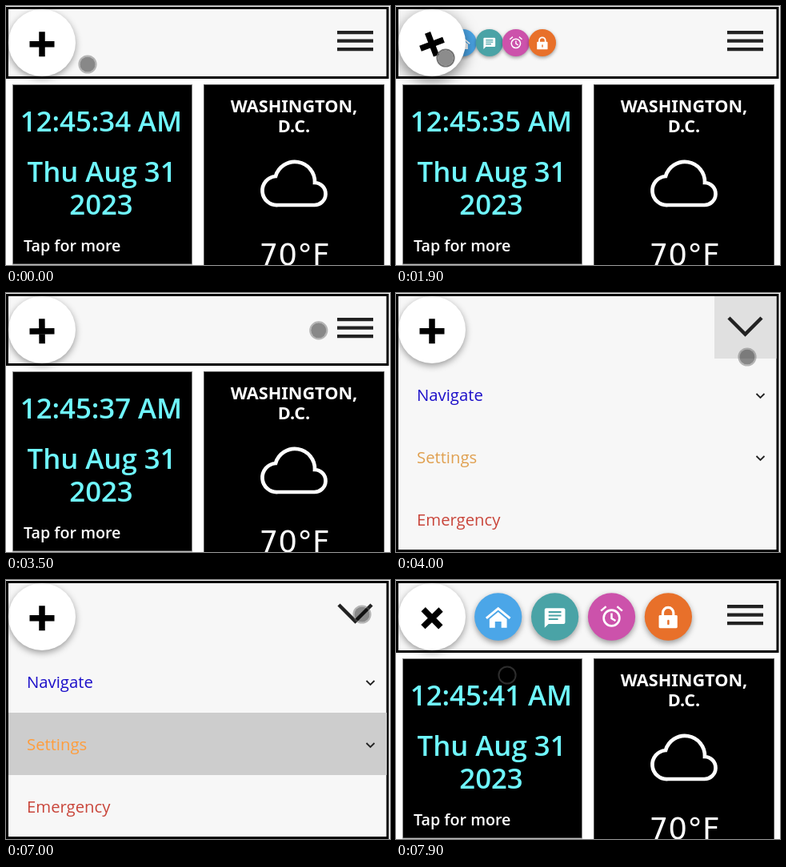
These frames come from a looping animation (480x324 px, 8 s). An HTML page:

```html
<!DOCTYPE html>
<html lang="en">
<head>
<meta charset="utf-8">
<title>Dashboard menu</title>
<style>
html, body { margin: 0; width: 480px; height: 324px; overflow: hidden; background: #fff; }
svg { display: block; }
text { font-family: "Open Sans", "Noto Sans", sans-serif; }
.clock { font-size: 34.8px; font-weight: 600; fill: #6ff7ff; text-anchor: middle; }
.city { font: 700 21.7px "Noto Sans", sans-serif; fill: #fff; text-anchor: middle; }
.degrees { font: 37.5px "DejaVu Sans", sans-serif; fill: #fff; text-anchor: middle; }
.row { font-size: 20.3px; }
.line { fill: none; stroke: #222; }
.white { fill: #fff; }
.stroke { fill: none; stroke: #fff; }
.raised { filter: drop-shadow(0 3px 4px rgba(0, 0, 0, .38)); }
.raised.pressed { filter: drop-shadow(0 6px 9px rgba(0, 0, 0, .5)); }
</style>
</head>
<body>
<svg width="480" height="324" viewBox="0 0 480 324">
  <g id="home">
    <rect x="8.5" y="98.5" width="224" height="224.5" stroke="#888"/>
    <rect x="247.5" y="98.5" width="225" height="240" stroke="#555"/>
    <text id="time" class="clock" x="119" y="157"></text>
    <text class="clock" x="119.5" y="220">Thu Aug 31</text>
    <text class="clock" x="119" y="261">2023</text>
    <text x="22" y="307" font-size="19.700" font-weight="600" fill="#fff">Tap for more</text>
    <text class="city" x="360" y="133">WASHINGTON,</text>
    <text class="city" x="360" y="158">D.C.</text>
    <path class="stroke" stroke-width="4.700" d="M340 249H385a14 14 0 0 0 1-28A25 25 0 0 0 337 213A18 18 0 0 0 340 249Z"/>
    <text class="degrees" x="360.5" y="323.500">70°F</text>
  </g>
  <rect id="frame" x="1.5" y="2.5" width="475.5" height="87" fill="#f7f7f7" stroke="#000" stroke-width="3"/>
  <path id="bars" class="line" stroke-width="4.300" d="M414 33.200h45m-45 10.500h45m-45 10.500h45"/>
  <g id="menu">
    <rect id="toggle" x="398" y="4" width="77.5" height="78" fill="#e0e0e0"/>
    <rect id="focus" x="3" width="473" height="78" fill="#cdcdcd"/>
    <path class="line" stroke-width="4.5" d="M416 31l20.500 20.500l20.500-20.500"/>
    <path class="line" stroke-width="1.8" d="M450.500 126l5 5l5-5"/>
    <path class="line" stroke-width="1.8" d="M450.500 204l5 5l5-5"/>
    <text class="row" x="26" y="135" fill="#1b0ec9">Navigate</text>
    <text id="settings" class="row" x="26" y="213">Settings</text>
    <text class="row" x="26" y="291" fill="#c9453a">Emergency</text>
  </g>
  <g id="items">
    <g><circle class="raised" r="30" fill="#4ba6e8"/>
      <path class="stroke" stroke-width="3" d="M-15 2L0-10.500L15 2"/>
      <path class="white" d="M-11 3L0-6L11 3V14H4V6H-4V14H-11Z"/></g>
    <g><circle class="raised" r="30" fill="#4aa3a6"/>
      <path class="white" d="M-11-11H11q2 0 2 2V7q0 2-2 2H-8L-13 14V-9q0-2 2-2Z"/>
      <path stroke="#4aa3a6" stroke-width="2.2" d="M-8-6H8M-8-1.500H8M-8 3H4"/></g>
    <g><circle class="raised" r="30" fill="#cc52ab"/>
      <circle class="stroke" cy="1.500" r="10" stroke-width="2.7"/>
      <path class="stroke" stroke-width="2.5" d="M0-4.500V2L5 5M-13.500-7.500L-7-13M13.500-7.500L7-13"/></g>
    <g><circle class="raised" r="30" fill="#e8702a"/>
      <rect class="white" x="-12" y="-2" width="23.500" height="16.500" rx="1.500"/>
      <path class="stroke" stroke-width="3.200" d="M-7-1V-5a6.700 6.700 0 0 1 13.500 0V-1"/>
      <path stroke="#e8702a" stroke-width="2.500" stroke-linecap="round" d="M0 5V9"/></g>
  </g>
  <circle id="button" class="raised" cx="45" cy="46" r="42" fill="#fff"/>
  <path id="plus" stroke="#000" stroke-width="7.500" d="M-15.500 0H15.500M0-15.500V15.500"/>
  <g id="cursor">
    <circle r="9.600" fill="rgba(0,0,0,.45)"/>
    <circle id="ring" r="10.600" fill="none" stroke-width="2"/>
  </g>
</svg>
<script>
const LOOP = 8000;
const $ = id => document.getElementById(id);
const show = (id, on) => $(id).style.display = on ? "" : "none";
const within = (t, a, b) => t >= a && t < b;
const smooth = x => (x = Math.min(1, Math.max(0, x)), x * x * (3 - 2 * x));

// time, x, y
const path = [
  [0, 102, 73], [1100, 62, 63], [1900, 62, 65], [2050, 62, 65], [2450, 128, 185],
  [2900, 91, 67], [3050, 64, 60], [3150, 64, 60], [3600, 437, 45], [3800, 437, 45],
  [4000, 439, 80], [4300, 445, 130], [5250, 445, 130], [5500, 446, 189],
  [5700, 447, 206], [6700, 447, 206], [7000, 445, 43], [7200, 445, 43],
  [7450, 62, 62], [7550, 62, 62], [7900, 139, 119], [8000, 139, 119]
];

function cursorAt(t) {
  const i = path.findIndex(k => k[0] > t);
  const [a, b] = [path[i - 1], path[i]];
  const p = smooth((t - a[0]) / (b[0] - a[0]));
  return [a[1] + (b[1] - a[1]) * p, a[2] + (b[2] - a[2]) * p];
}

function draw(t) {
  const menu = within(t, 3700, 7200);
  show("home", !menu);
  show("bars", !menu);
  show("menu", menu);
  $("frame").setAttribute("height", menu ? 320 : 87);
  $("time").textContent = `12:45:${34 + Math.max(0, Math.floor((t - 300) / 1000))} AM`;

  const onSettings = t >= 5700;
  show("toggle", t < 4100);
  show("focus", t >= 4350);
  $("focus").setAttribute("y", onSettings ? 166 : 88);
  $("settings").setAttribute("fill", onSettings ? "#ff9d3c" : "#e0a050");

  const step = start => smooth((t - start) / 450);
  const open = step(1688) - step(3080) + step(7484);
  [...$("items").children].forEach((item, i) =>
    item.setAttribute("transform",
      `translate(${45 + open * (84 + 72 * i)} 46) scale(${.2 + .8 * open})`));
  $("plus").setAttribute("transform", `translate(45 47.8) rotate(${-45 * open})`);

  const pressed = within(t, 1600, 1960);
  $("button").classList.toggle("pressed", pressed);
  $("cursor").setAttribute("transform", `translate(${cursorAt(t)})`);
  $("ring").setAttribute("stroke", `rgba(100,100,100,${pressed ? .9 : .45})`);
}

function tick() {
  draw(performance.now() % LOOP);
  requestAnimationFrame(tick);
}
tick();
</script>
</body>
</html>
```
